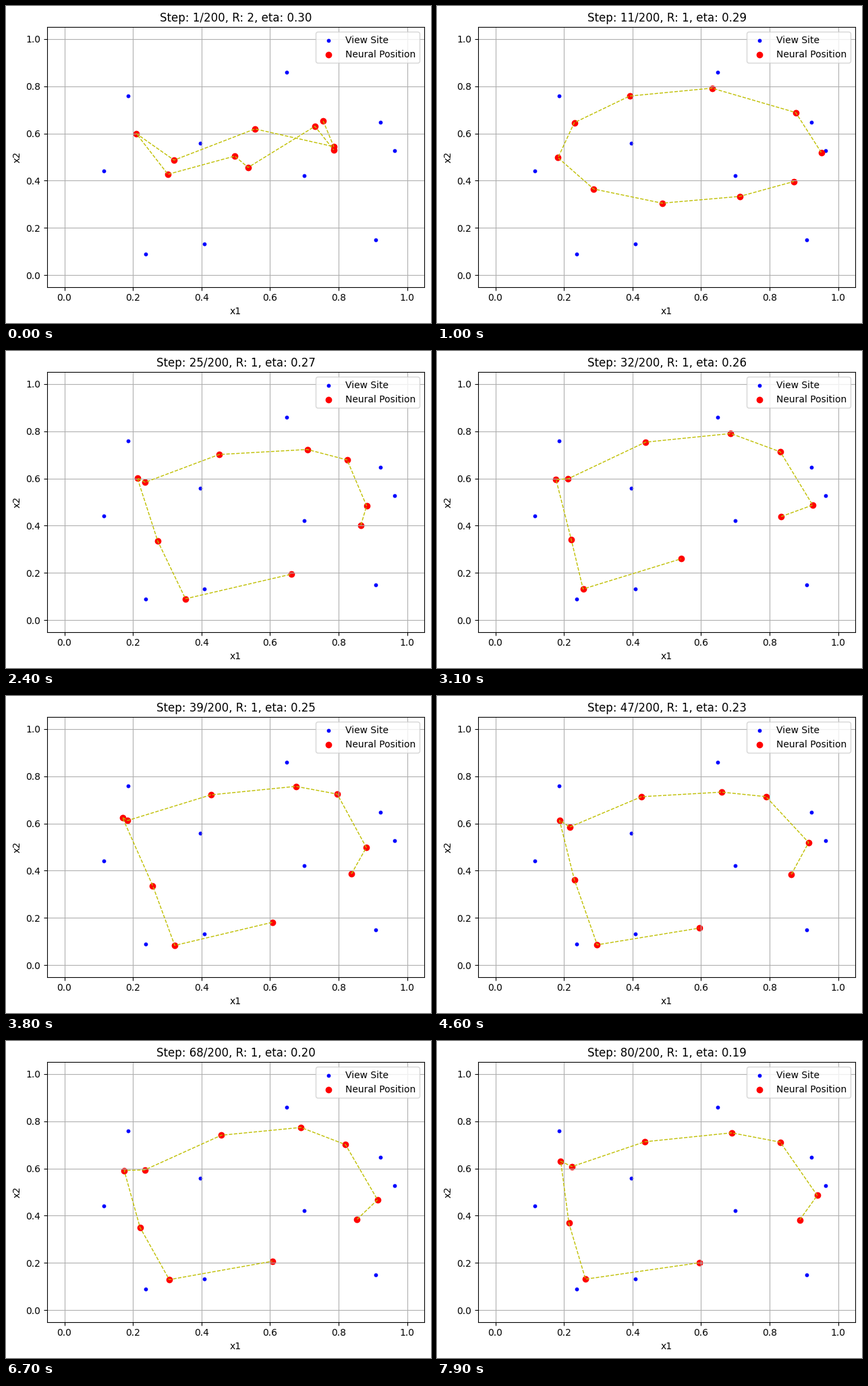
Animation of 630x469 px, one loop 8 s. Source, as a matplotlib script:

```python
import numpy as np
import matplotlib.pyplot as plt
from matplotlib.animation import FuncAnimation

W, H, DPI = 630, 469, 100
STEPS, FRAMES, N = 200, 80, 10
LEFT, RIGHT, TOP, BOTTOM = 61.15, 620.05, 31.25, 415.7

sites = np.array([
    (0.186, 0.759), (0.115, 0.441), (0.237, 0.089), (0.408, 0.132), (0.396, 0.559),
    (0.648, 0.859), (0.700, 0.421), (0.922, 0.647), (0.963, 0.527), (0.908, 0.149)])

# Chain after the first step, and the shape it settles around
start = np.array([
    (0.755, 0.653), (0.786, 0.544), (0.556, 0.619), (0.320, 0.487), (0.210, 0.599),
    (0.302, 0.427), (0.497, 0.504), (0.536, 0.456), (0.731, 0.630), (0.786, 0.530)])
settled = np.array([
    (0.863, 0.379), (0.900, 0.476), (0.810, 0.693), (0.694, 0.750), (0.456, 0.727),
    (0.237, 0.596), (0.198, 0.599), (0.247, 0.335), (0.316, 0.098), (0.617, 0.184)])


def open_ring():
    """Open elliptic loop the chain unfolds into."""
    k = np.arange(N)
    a = np.radians(36 * k - 4 + 12 * np.sin(np.pi * k / (N - 1)))
    return np.column_stack([0.57 + 0.375 * np.cos(a), 0.53 + 0.24 * np.sin(a)])


def smooth(u):
    u = np.clip(u, 0, 1)
    return u * u * (3 - 2 * u)


def build_path():
    """Unfold, drift to the settled shape, and jitter with each noisy step."""
    rng = np.random.default_rng(4)
    ring = open_ring()
    path, noise = [start], np.zeros((N, 2))
    for i in range(1, FRAMES):
        base = ring + (settled - ring) * smooth((i - 10) / 14)
        kick = rng.normal(0, 0.024, (N, 2))
        # neighbours on the chain are pulled along
        kick = 0.8 * kick + 0.4 * (np.roll(kick, 1, 0) + np.roll(kick, -1, 0))
        noise = 0.4 * noise + kick
        path.append(base + (start - base) * np.exp(-i / 2.5) + noise)
    return path


path = build_path()

fig = plt.figure(figsize=(W / DPI, H / DPI), dpi=DPI)
ax = fig.add_axes([LEFT / W, 1 - BOTTOM / H, (RIGHT - LEFT) / W, (BOTTOM - TOP) / H])
ax.scatter(*sites.T, s=10, c="b", label="View Site")
neurons = ax.scatter(*start.T, c="r", label="Neural Position")
chain, = ax.plot(*start.T, "y--", lw=1)
ax.set(xlim=(-0.05, 1.05), ylim=(-0.05, 1.05), xlabel="x1", ylabel="x2")
ax.grid(True)
ax.legend(loc="upper right")
title = ax.set_title("")


def update(i):
    radius = 2 if i == 0 else 1
    eta = 0.3 - 0.00143 * i
    title.set_text(f"Step: {i + 1}/{STEPS}, R: {radius}, eta: {eta:.2f}")
    neurons.set_offsets(path[i])
    chain.set_data(*path[i].T)
    return title, neurons, chain


anim = FuncAnimation(fig, update, frames=FRAMES, interval=100, repeat=True)
plt.show()
```
